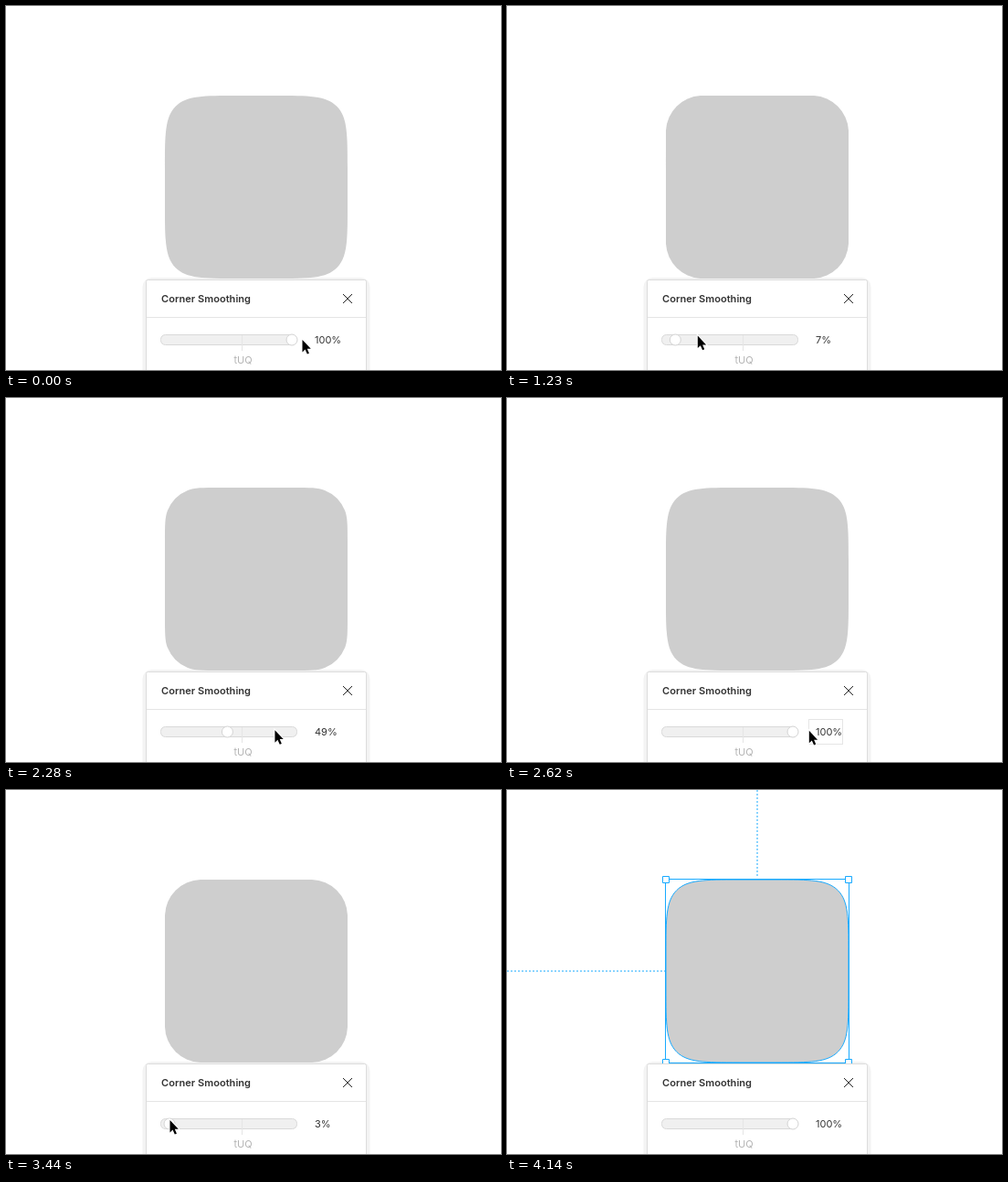
An HTML page that plays this animation: 542x398 px, repeating every 4400 ms.

```html
<!DOCTYPE html>
<html lang="en">
<head>
<meta charset="utf-8">
<title>Corner Smoothing</title>
<style>
  html, body { margin: 0; width: 100%; height: 100%; overflow: hidden; background: #fff; }
  svg { display: block; width: 100vw; height: 100vh; }
  text { font: 11px Inter, sans-serif; fill: #333; }
  .title { font-weight: 600; letter-spacing: .05px; }
  .label { fill: #b3b3b3; text-anchor: middle; }
  .line { fill: none; stroke: #e5e5e5; }
  .selection { fill: none; stroke: #18aaff; }
  .handle { fill: #fff; }
</style>
</head>
<body>
<svg viewBox="0 0 542 398">
  <rect x="149.5" y="297" width="249" height="120" rx="10" fill="#f3f3f3"/>
  <path id="shape" fill="#cecece" transform="translate(274 198)"/>
  <g id="selection" class="selection">
    <path stroke-dasharray="2 2" d="M0 198H173M274 0V95"/>
    <path id="outline" transform="translate(274 198)"/>
    <rect x="173.5" y="97.5" width="201" height="201"/>
    <path class="handle" d="M170.5 94.5h7v7h-7zM370.5 94.5h7v7h-7zM170.5 294.5h7v7h-7zM370.5 294.5h7v7h-7z"/>
  </g>

  <rect x="153.5" y="299.5" width="241" height="120" rx="2" fill="#fff" stroke="#dcdcdc"/>
  <text class="title" x="170" y="324">Corner Smoothing</text>
  <path d="M369 315l10 10m0-10l-10 10" stroke="#222"/>
  <path class="line" d="M154 340.5H394"/>

  <rect x="169.5" y="359.5" width="149" height="11" rx="5" fill="#f0f0f0" stroke="#d9d9d9"/>
  <path class="line" d="M258.5 360V377"/>
  <text class="label" x="259.5" y="391">tUQ</text>
  <circle id="knob" cy="365" r="6" fill="#fff" stroke="#d4d4d4"/>
  <rect id="field" class="line" x="330.5" y="351.5" width="37" height="27"/>
  <text id="value" x="338" y="369"></text>

  <path id="cursor" d="M.5 1V14.5L3.5 11.6 5.8 16.6 7.9 15.7 5.8 10.8H9.8Z" stroke="#fff" paint-order="stroke" stroke-width="2"/>
</svg>
<script>
const LOOP = 4400, FIRST_TICK = 402, TICK = 58.3;
const HALF = 100, RADIUS = 40;
const SELECT_TICK = 59;
const TRACK_START = 175, TRACK_LENGTH = 138;

// Pointer drags, left and right in turn; each begins where the last one ended.
const home = { x: 324, y: 364 };
const drags = [
  { from: -1, to: 8, x: 175, y: 360 },
  { from: 12, to: 19, x: 343, y: 358 },
  { from: 21.5, to: 28.8, x: 168, y: 360 },
  { from: 28.8, to: 33.6, x: 338, y: 363 },
  { from: 36.55, to: 47.45, x: 179, y: 360 },
  { from: 52, to: 62, x: 513, y: 400 }
];

const el = id => document.getElementById(id);
const clamp = (n, low, high) => Math.min(high, Math.max(low, n));
const smoothstep = t => t * t * (3 - 2 * t);

function pointerAt(tick) {
  return drags.reduce((point, drag) => {
    const k = smoothstep(clamp((tick - drag.from) / (drag.to - drag.from), 0, 1));
    return { x: point.x + (drag.x - point.x) * k, y: point.y + (drag.y - point.y) * k };
  }, home);
}

// Each corner is an arc that shrinks with smoothing, eased in and out by two Béziers.
function squircle(smoothing) {
  const theta = Math.PI / 4 * smoothing;
  const reach = RADIUS * (1 + smoothing);
  const arc = Math.sin(Math.PI / 4 - theta) * RADIUS * Math.SQRT2;
  const c = RADIUS * Math.tan(theta / 2) * Math.cos(theta);
  const d = c * Math.tan(theta);
  const b = (reach - arc - c - d) / 3;
  const a = 2 * b;
  const end = a + b + c;
  let path = "";
  for (let side = 0; side < 4; side++) {
    const turn = (x, y) => {
      for (let i = 0; i < side; i++) [x, y] = [-y, x];
      return x.toFixed(3) + " " + y.toFixed(3) + " ";
    };
    path += (side ? "L" : "M") + turn(HALF - reach, -HALF)
      + "c" + turn(a, 0) + turn(a + b, 0) + turn(end, d)
      + `a${RADIUS} ${RADIUS} 0 0 1 ` + turn(arc, arc)
      + "c" + turn(d, c) + turn(d, b + c) + turn(d, end);
  }
  return path + "Z";
}

function draw(now) {
  const tick = Math.max(-1, Math.floor((now % LOOP - FIRST_TICK) / TICK));
  const { x, y } = pointerAt(tick);
  // The slider trails the pointer by one tick.
  const dragged = clamp((pointerAt(tick - 1).x - TRACK_START) / TRACK_LENGTH, 0, 1);
  const percent = Math.round(dragged * 100);
  const path = squircle(percent / 100);
  const hovered = x >= 330 && x <= 368 && y >= 351 && y <= 379;

  el("shape").setAttribute("d", path);
  el("outline").setAttribute("d", path);
  el("knob").setAttribute("cx", TRACK_START + dragged * TRACK_LENGTH);
  el("value").textContent = percent + "%";
  el("cursor").setAttribute("transform", `translate(${x} ${y})`);
  el("field").style.display = hovered ? "" : "none";
  el("selection").style.display = tick >= SELECT_TICK ? "" : "none";
}

const start = performance.now();
function frame() {
  draw(performance.now() - start);
  requestAnimationFrame(frame);
}
frame();
</script>
</body>
</html>
```
